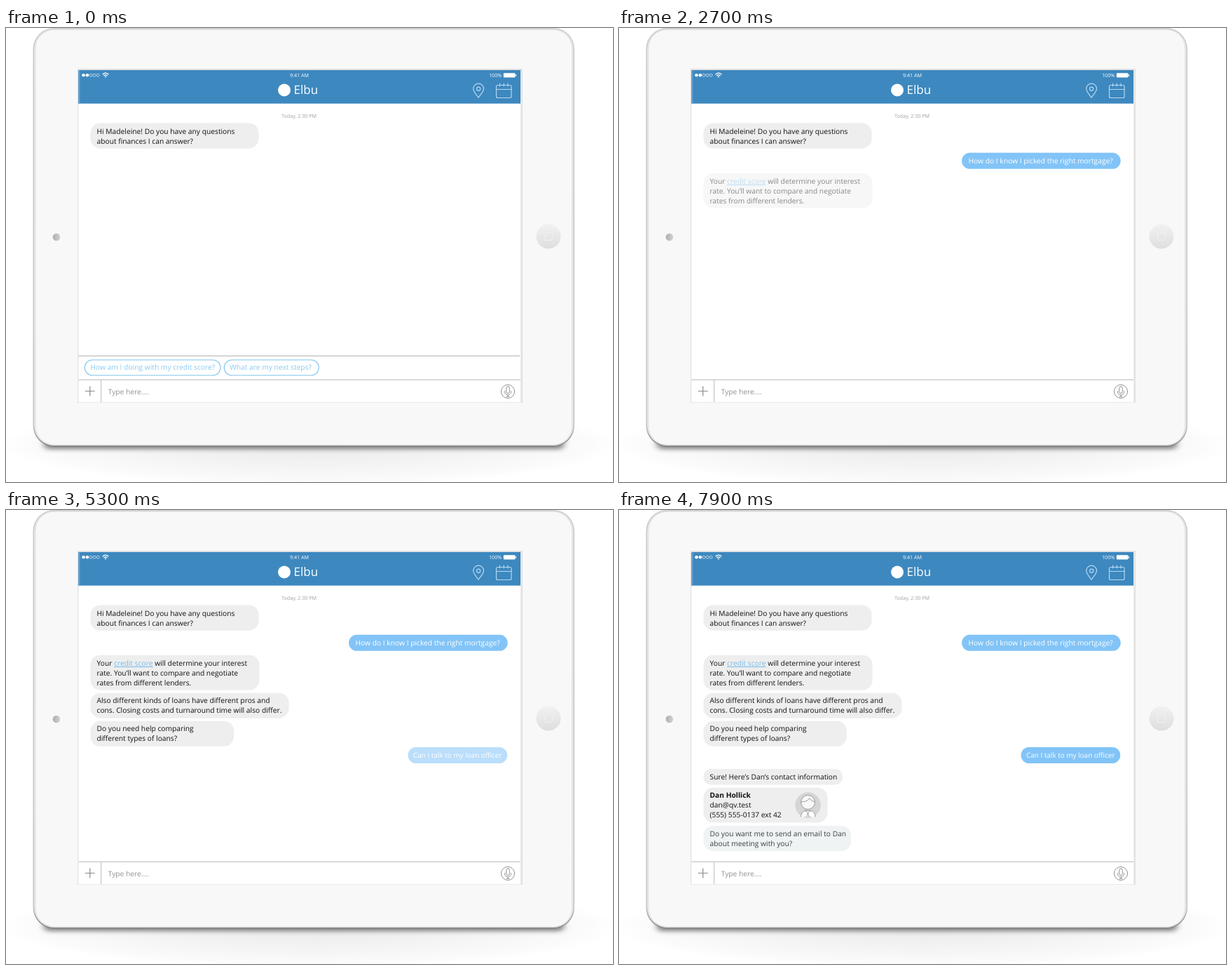
An HTML page that plays this animation: 866x647 px, repeating every 8000 ms.

```html
<!DOCTYPE html>
<html lang="en">
<head>
<meta charset="utf-8">
<title>Chat on a tablet</title>
<style>
html, body { margin: 0; width: 100%; height: 100%; overflow: hidden; background: #fff; }
svg { display: block; width: 866px; height: 647px; }
text { font: 10.25px "Open Sans", sans-serif; text-rendering: geometricPrecision; }
.small { font-size: 7.2px; }
.brand { font-size: 17px; }
.bold { font-weight: 700; }
.bot rect { fill: #eee; }
.bot text { fill: #111; }
.user rect { fill: #82c4f7; }
.user text { fill: #fff; }
.link { fill: #76bdec; text-decoration: underline; }
.pills rect { fill: #fff; stroke: #7fc3ee; stroke-width: 1.1; }
.pills text { fill: #8bc9f1; }
.icon { fill: none; stroke-linecap: round; stroke-linejoin: round; }

/* each message appears in two hard steps: half faded, then solid */
.anim { animation: 8s step-end infinite; }
.out { animation-name: out; }
.rule { animation-name: rule; }
.ask { animation-name: ask; }
.score { animation-name: score; }
.kinds { animation-name: kinds; }
.help { animation-name: help; }
.talk { animation-name: talk; }
.sure { animation-name: sure; }
.card { animation-name: card; }
.mail { animation-name: mail; }
@keyframes out { 0% { opacity: 1 } 12.5% { opacity: .5 } 15%, 100% { opacity: 0 } }
@keyframes rule { 0% { opacity: 1 } 15%, 100% { opacity: 0 } }
@keyframes ask { 0% { opacity: 0 } 12.5% { opacity: .5 } 15%, 100% { opacity: 1 } }
@keyframes score { 0% { opacity: 0 } 33.75% { opacity: .5 } 36.25%, 100% { opacity: 1 } }
@keyframes kinds { 0% { opacity: 0 } 42.5% { opacity: .75 } 45%, 100% { opacity: 1 } }
@keyframes help { 0% { opacity: 0 } 51.25% { opacity: .5 } 53.75%, 100% { opacity: 1 } }
@keyframes talk { 0% { opacity: 0 } 66.25% { opacity: .55 } 68.75%, 100% { opacity: 1 } }
@keyframes sure { 0% { opacity: 0 } 81.25% { opacity: .33 } 83.75%, 100% { opacity: 1 } }
@keyframes card { 0% { opacity: 0 } 90% { opacity: .5 } 92.5%, 100% { opacity: 1 } }
@keyframes mail { 0% { opacity: 0 } 98.75%, 100% { opacity: .8 } }
</style>
</head>
<body>
<svg viewBox="0 0 866 647">
  <defs>
    <radialGradient id="glow">
      <stop offset="0" stop-color="#e9e9e9"/>
      <stop offset=".55" stop-color="#f4f4f4"/>
      <stop offset=".9" stop-color="#fbfbfb"/>
      <stop offset="1" stop-color="#fff"/>
    </radialGradient>
    <linearGradient id="rim" x2="0" y2="1">
      <stop offset="0" stop-color="#cbcbcb"/>
      <stop offset=".95" stop-color="#c6c6c6"/>
      <stop offset="1" stop-color="#858585"/>
    </linearGradient>
    <linearGradient id="home" x2="0" y2="1">
      <stop offset="0" stop-color="#f1f1f1"/>
      <stop offset="1" stop-color="#dedede"/>
    </linearGradient>
    <linearGradient id="lens" x2="1" y2="0">
      <stop offset="0" stop-color="#aeaeae"/>
      <stop offset="1" stop-color="#d2d2d2"/>
    </linearGradient>
    <filter id="soft" x="-10%" y="-200%" width="120%" height="500%">
      <feGaussianBlur stdDeviation="5 3"/>
    </filter>
  </defs>

  <!-- tablet -->
  <ellipse cx="433" cy="594" rx="440" ry="58" fill="url(#glow)"/>
  <rect x="54" y="586" width="742" height="14" rx="7" fill="#555" opacity=".75" filter="url(#soft)"/>
  <rect x="38.5" y="0" width="772.5" height="596.5" rx="30" fill="url(#rim)"/>
  <rect x="40.3" y="1.4" width="769" height="593.6" rx="28.5" fill="#ededed"/>
  <rect x="42" y="2.2" width="765.6" height="592" rx="27" fill="#f8f8f8" stroke="#d9d9d9" stroke-width=".8"/>
  <circle cx="72" cy="298" r="5.3" fill="url(#lens)"/>
  <circle cx="774" cy="297" r="17.5" fill="url(#home)"/>
  <rect x="768.5" y="291.5" width="11" height="11" rx="2.5" fill="none" stroke="#f1f1f1"/>

  <!-- screen -->
  <rect x="102" y="58" width="635" height="476" fill="#e2e2e2"/>
  <rect x="103.3" y="60" width="631" height="473.3" fill="#fff"/>
  <rect x="103" y="60" width="631" height="47.7" fill="#3d88bf"/>
  <rect x="103" y="60" width="2.5" height="47.7" fill="#64a2ce"/>

  <!-- status bar -->
  <g fill="#fff">
    <circle cx="110.6" cy="67.3" r="2.3"/>
    <circle cx="115.9" cy="67.3" r="2.3"/>
    <g fill="none" stroke="#fff" stroke-width=".6">
      <circle cx="121" cy="67.3" r="2"/>
      <circle cx="126.1" cy="67.3" r="2"/>
      <circle cx="131.2" cy="67.3" r="2"/>
    </g>
    <g class="icon" stroke="#fff" stroke-width="1.2">
      <path d="M138 65.8q4-3.4 8 0M139.7 67.8q2.3-2 4.6 0"/>
    </g>
    <circle cx="142" cy="69.4" r="1"/>
    <text class="small" x="418.5" y="70" text-anchor="middle">9:41 AM</text>
    <text class="small" x="689" y="70">100%</text>
    <rect x="709.8" y="64.3" width="16.6" height="6.2" rx="1"/>
    <rect x="726.8" y="66" width="1.2" height="2.8"/>
    <circle cx="397" cy="88.5" r="9"/>
    <text class="brand" x="410.5" y="94.3">Elbu</text>
  </g>
  <g class="icon" stroke="#b3d8f2" stroke-width="1.2">
    <path d="M674 99.3C671 94.5 666.7 91 666.7 86.6a7.4 7.4 0 0 1 14.8 0C681.500 91 677 94.500 674 99.300z"/>
    <circle cx="674.1" cy="86.800" r="2.600"/>
    <rect x="699.500" y="81.500" width="21.500" height="18" rx="2"/>
    <path d="M699.500 87.500h21.500M704.500 79v4M710.200 79v4M716 79v4"/>
  </g>

  <!-- conversation -->
  <text class="small" x="418" y="128" text-anchor="middle" fill="#a0a0a0">Today, 2:30 PM</text>
  <g class="bot">
    <rect x="120.500" y="135.500" width="240" height="36.200" rx="14"/>
    <text x="129.500" y="151">Hi Madeleine! Do you have any questions</text>
    <text x="129.500" y="165">about finances I can answer?</text>
  </g>
  <g class="user anim ask">
    <rect x="489" y="177.800" width="226.700" height="23" rx="11.500"/>
    <text x="498.500" y="192.500">How do I know I picked the right mortgage?</text>
  </g>
  <g class="bot anim score">
    <rect x="120.500" y="206.700" width="241" height="50" rx="14"/>
    <text x="129.500" y="222">Your <tspan class="link">credit score</tspan> will determine your interest</text>
    <text x="129.500" y="236">rate. You’ll want to compare and negotiate</text>
    <text x="129.500" y="250">rates from different lenders.</text>
  </g>
  <g class="bot anim kinds">
    <rect x="120.500" y="260.700" width="283" height="36" rx="14"/>
    <text x="129.500" y="275.200">Also different kinds of loans have different pros and</text>
    <text x="129.500" y="289.200">cons. Closing costs and turnaround time will also differ.</text>
  </g>
  <g class="bot anim help">
    <rect x="120.500" y="300.800" width="204.500" height="36" rx="14"/>
    <text x="129.500" y="315.400">Do you need help comparing</text>
    <text x="129.500" y="329.400">different types of loans?</text>
  </g>
  <g class="user anim talk">
    <rect x="573.500" y="338" width="141.700" height="23" rx="11.500"/>
    <text x="581" y="353.300" style="font-size:9.950px">Can I talk to my loan officer</text>
  </g>
  <g class="bot anim sure">
    <rect x="120.500" y="369" width="198.500" height="22.500" rx="11"/>
    <text x="129.500" y="384.300">Sure! Here’s Dan’s contact information</text>
  </g>
  <g class="bot anim card">
    <rect x="120.500" y="395.700" width="177" height="49.800" rx="14"/>
    <text class="bold" x="129.500" y="410.300">Dan Hollick</text>
    <text x="129.500" y="424.300">dan@qv.test</text>
    <text x="129.500" y="438.300">(555) 555-0137 ext 42</text>
    <circle cx="269.600" cy="420.500" r="18.200" fill="#d5d5d5"/>
    <g class="icon" stroke="#999" stroke-width="1">
      <path d="M259.500 437q0-7 6.500-8.500h7.500q6.500 1.500 6.500 8.500" fill="#fff"/>
      <circle cx="269.600" cy="416.500" r="10" fill="#f8f8f8"/>
      <path d="M260 416q8 0 12-5 2 4 7.300 5"/>
      <path d="M265.500 428.500l4 3.500 4-3.500M269.500 432l-2 5.500M269.500 432l2 5.500"/>
    </g>
  </g>
  <g class="bot anim mail">
    <rect x="120.500" y="450" width="210.500" height="36" rx="14" style="fill:#ebf0f0"/>
    <text x="129.500" y="465.200">Do you want me to send an email to Dan</text>
    <text x="129.500" y="479.200">about meeting with you?</text>
  </g>

  <!-- quick replies and input -->
  <path class="anim rule" d="M103.500 467.300H733" stroke="#bebebe" stroke-width="1.300"/>
  <g class="pills anim out">
    <rect x="112.300" y="473" width="193.700" height="22" rx="11"/>
    <rect x="311.300" y="473" width="135" height="22" rx="11"/>
    <text x="120.500" y="487.300">How am I doing with my credit score?</text>
    <text x="319.300" y="487.300">What are my next steps?</text>
  </g>
  <path d="M103.500 501.400H734M135.700 501.400V533.500" fill="none" stroke="#c6c6c6" stroke-width="1.200"/>
  <path d="M112.800 517.500h14M119.800 510.500v14" stroke="#8c8c8c" stroke-width="1.200"/>
  <text x="145.700" y="521.500" fill="#929292">Type here....</text>
  <g class="icon" stroke="#929292" stroke-width="1">
    <circle cx="716" cy="518" r="9.600"/>
    <rect x="713.700" y="511" width="4.600" height="9.500" rx="2.300"/>
    <path d="M711.500 517.500v1a4.500 4.500 0 0 0 9 0v-1M716 523v2.300M713.800 525.300h4.400"/>
  </g>
</svg>
</body>
</html>
```
